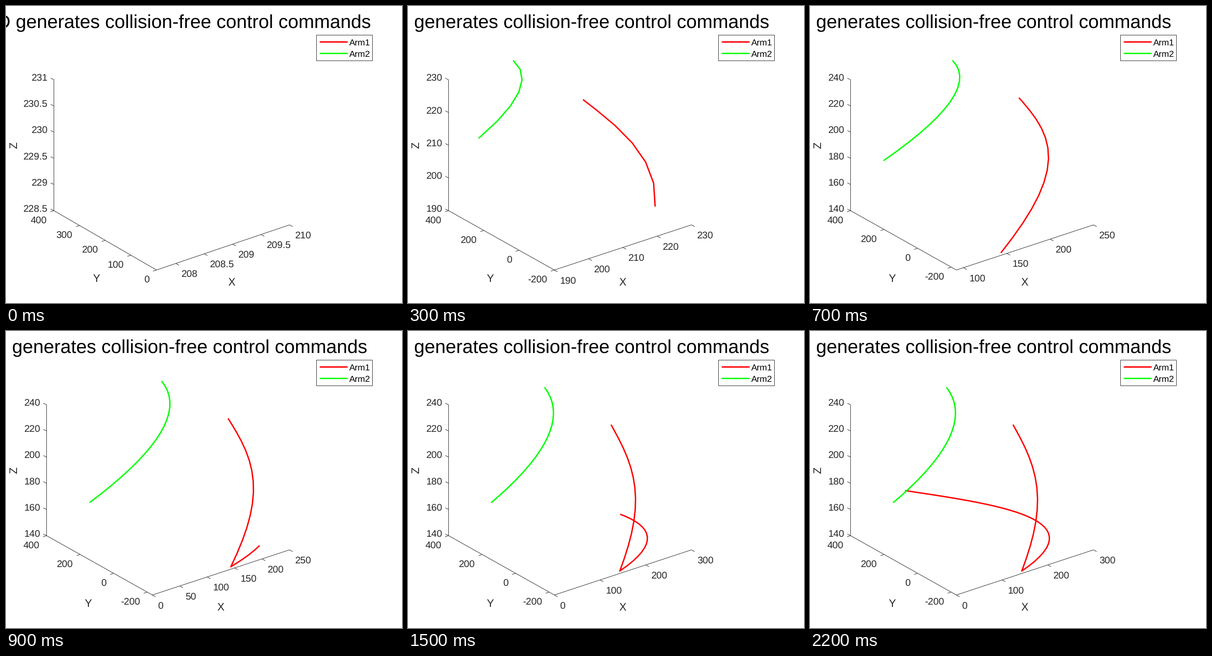
Recreate the animation shown at these times as a matplotlib script. Size 864 by 648 pixels, loop 2.35 s.

```python
import numpy as np
import matplotlib.pyplot as plt
from matplotlib.animation import FuncAnimation
from matplotlib.patches import Rectangle

plt.rcParams["text.hinting"] = "none"

W, H = 864, 648
FRAMES, LAST, TURN, STOP = 47, 44, 14, 18
INK = (0.15, 0.15, 0.15)
RED, GREEN = (1, 0, 0), (0, 1, 0)
TICK = 21.3
X0, Z0 = 208.66, 229.6
RIGHT = 618
START_BOX = ((X0 - 1, 210, 0.5), (0, 400, 100), (228.5, 231, 0.5))


def reach(n):
    """Arm1 swings out and down, with a soft start."""
    s = n - 0.5 * (1 - np.exp(-1.3 * n))
    return np.array([X0 + s * (5.5 - s**2 * (0.1 - 0.0032 * s)),
                     -s * (15 + 0.156 * s),
                     Z0 - 6.5 * s])


def arm1(n):
    """Arm1 reaches to its turning point, then sweeps back along Y."""
    t = max(n - TURN, 0)
    back = np.array([t * (23.5 - t * (1.288 - 0.0147 * t)),
                     18 * t,
                     t**2 * (0.0505 - 0.0006 * t)])
    return reach(min(n, TURN)) + back


def arm2(n):
    """Arm2 follows one arc and then rests."""
    n = min(n, STOP)
    return np.array([X0 + n * (1.95 - 0.7358 * n),
                     396.5 - n * (16.3 - 0.178 * n),
                     Z0 - 2.66 * n])


def trail(arm, n):
    return np.array([arm(k) for k in range(n + 1)])


def nice_step(span, most):
    base = 10.0 ** np.floor(np.log10(span / most))
    return next(m * base for m in (1, 2, 5, 10) if span / (m * base) <= most)


def limits(lo, hi, most):
    """Tick-aligned range; the low end stays tight if aligning wastes space."""
    step = nice_step(hi - lo, most)
    low, high = np.floor(lo / step) * step, np.ceil(hi / step) * step
    if (lo - low) / (high - low) > 0.2:
        low = lo
    return low, high, step


def data_box(points):
    return [limits(lo, hi, most) for lo, hi, most
            in zip(points.min(axis=0), points.max(axis=0), (4.6, 4.6, 5.7))]


def ticks(lo, hi, step):
    first = np.ceil(lo / step - 1e-9)
    return np.arange(first, np.floor(hi / step + 1e-9) + 1) * step + 0.0


fig = plt.figure(figsize=(W / 72, H / 72), dpi=72, facecolor="white")
ax = fig.add_axes([0, 0, 1, 1])


def write(x, y, text, size, color=INK, **kw):
    ax.text(x, y, text, fontsize=size, color=color, family="Liberation Sans", **kw)


def line(pts, color=INK, width=1.0):
    xs, ys = np.transpose(pts)
    ax.plot(xs, ys, color=color, lw=width,
            solid_capstyle="butt", solid_joinstyle="round")


def draw_axes(box, left, corner, project):
    lows = np.array([b[0] for b in box], float)
    line([(left, 160.5), (left, 446), corner, (RIGHT, 477)])
    # tick direction, label offset and alignment for each axis
    styles = (((7, 3.9), (12.3, 29.5), "left"),
              ((-7.6, 2.5), (-15.5, 27), "right"),
              ((-7, -3.6), (-13.5, 2), "right"))
    for i, (mark, shift, align) in enumerate(styles):
        for value in ticks(*box[i]):
            point = lows.copy()
            point[i] = value
            if i == 2:
                point[1] = box[1][1]
            x, y = project(point)
            line([(x, y), (x + mark[0], y + mark[1])])
            write(x + shift[0], y + shift[1], f"{value:g}", TICK, ha=align)


def draw_legend():
    ax.add_patch(Rectangle((676, 62), 122, 56, fc="white", ec=INK, lw=1))
    for y, color, name in ((77.4, RED, "Arm1"), (102.7, GREEN, "Arm2")):
        line([(683, y), (744, y)], color, 3)
        write(748, y + 7.6, name, 19.2, "black")


def update(frame):
    n = min(frame, LAST)
    ax.clear()
    ax.set_xlim(-0.5, W - 0.5)
    ax.set_ylim(H - 0.5, -0.5)
    ax.axis("off")

    path1, path2 = trail(arm1, n), trail(arm2, n)
    box = data_box(np.vstack([path1, path2])) if n else START_BOX
    wide = box[2][2] < 1          # decimal labels push the axes to the right
    left = 104 if wide else 88
    corner = np.array([left + 0.4355 * (RIGHT - left), 575.5])
    basis = np.array([(RIGHT - corner[0], -98.5),
                      (left - corner[0], -129.5),
                      (0, -285.5)])
    lo, hi = np.array([b[:2] for b in box], float).T

    def project(p):
        return corner + (p - lo) / (hi - lo) @ basis

    draw_axes(box, left, corner, project)
    write(492 if wide else 468, 609, "X", 23.5, ha="center")
    write(197 if wide else 179, 602, "Y", 23.5, ha="center")
    write(18, 303.5, "Z", 23.5, ha="center", va="center", rotation=90)
    write((left + RIGHT) / 2 + 434.5, 48,
          "D generates collision-free control commands", 41.2, "black", ha="right")

    if n:
        line(project(path1), RED, 3)
        line(project(path2), GREEN, 3)
    draw_legend()
    return []


anim = FuncAnimation(fig, update, frames=FRAMES, init_func=lambda: [],
                     interval=50, repeat=True, repeat_delay=0)
plt.show()
```
